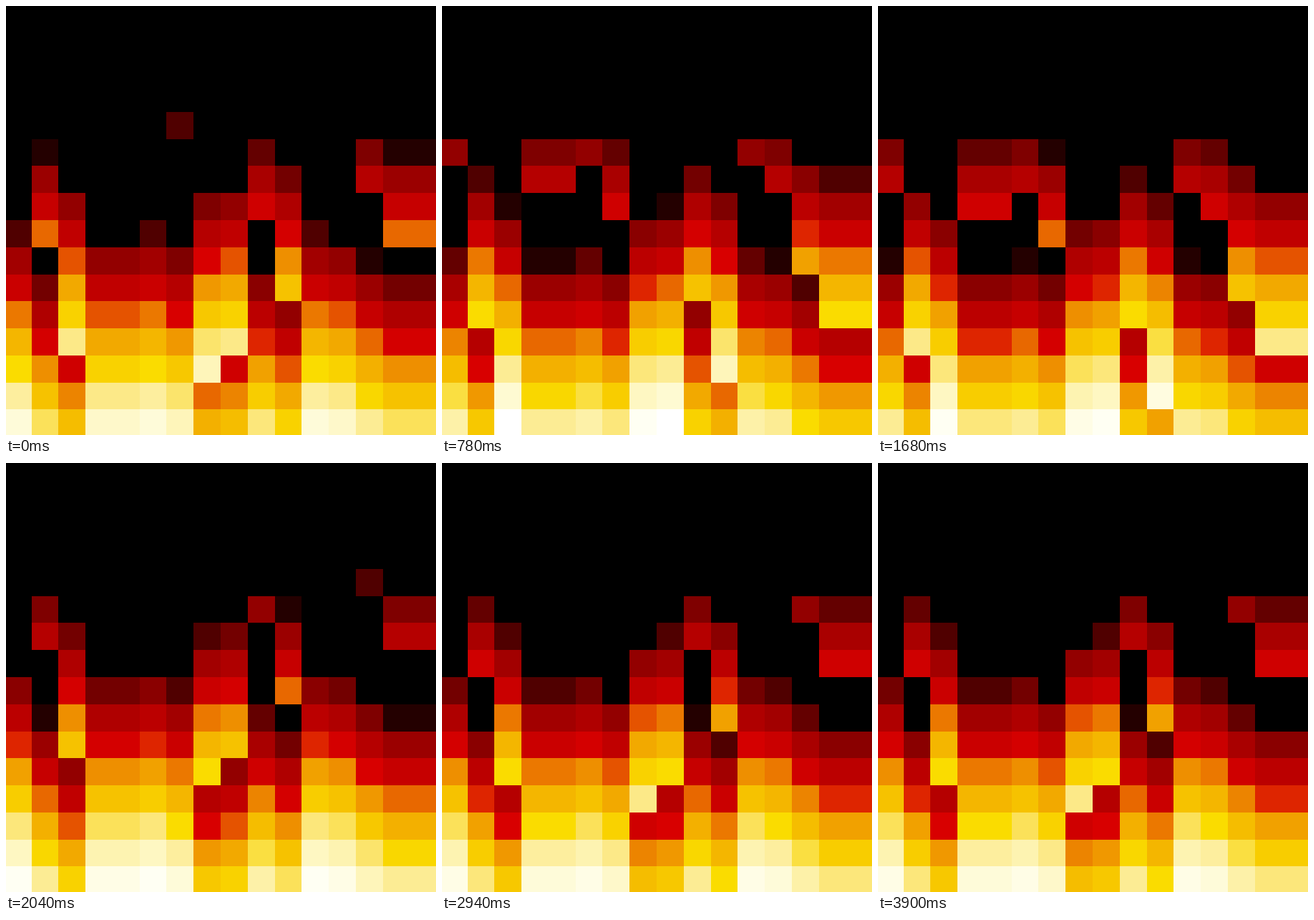
Write an HTML page with a canvas that moves like this. It is 601 px wide and 599 px high and loops after 3.96 s.

```html
<!DOCTYPE html>
<html>
<head>
<meta charset="utf-8">
<title>Pixel fire</title>
<style>
html, body { margin: 0; height: 100%; overflow: hidden; background: #000; }
canvas { display: block; }
</style>
</head>
<body>
<canvas id="fire" width="601" height="599"></canvas>
<script>
const ctx = document.getElementById('fire').getContext('2d');
const STEP = 60, STEPS = 66, CYCLE = 16, PITCH = 37.775;

// Where each column stands in the flicker cycle
const phases = [3, 9, 13, 4, 4, 3, 5, 14, 13, 8, 11, 3, 4, 7, 9, 9];

// Heat levels at which the ramp reaches red, yellow and white
const RED = 19, YELLOW = 37, WHITE = 57;

const mod = (a, n) => ((a % n) + n) % n;
const leftOf = col => col ? Math.floor(36.03 + PITCH * (col - 1)) : 0;
const topOf = row => row < 0 ? 599 : Math.floor(563.925 - PITCH * row);

// Fast start, slow finish, from 0 to 1 over the span
const glow = (heat, span) => (Math.max(0, heat - 0.88) / (span - 0.88)) ** (1 / 2.8);

function colour(heat) {
  if (heat <= RED) return `rgb(${216 * glow(heat, RED)},0,0)`;
  if (heat <= YELLOW) {
    const k = glow(heat - RED, YELLOW - RED);
    return `rgb(${216 + 34 * k},${220 * k},0)`;
  }
  const k = (heat - YELLOW) / (WHITE - YELLOW);
  const ease = Math.sin(k * Math.PI / 2);
  return `rgb(${250 + 5 * ease},${220 + 35 * ease},${255 * k ** (1 / 2.2)})`;
}

function draw(step) {
  ctx.fillStyle = '#000';
  ctx.fillRect(0, 0, 601, 599);
  phases.forEach((phase, col) => {
    const x = leftOf(col), w = leftOf(col + 1) - x;
    // Rows count up from the bottom; each heats up, then drops back
    for (let row = 0; row < 12; row++) {
      const heat = 57 - 5 * row - 2 * mod(phase + row - step, CYCLE);
      if (heat <= 0) continue;
      const y = topOf(row);
      ctx.fillStyle = colour(heat);
      ctx.fillRect(x, y, w, topOf(row - 1) - y);
    }
  });
}

const start = performance.now();
function tick() {
  draw(Math.floor((performance.now() - start) / STEP + 0.01) % STEPS);
  requestAnimationFrame(tick);
}
tick();
</script>
</body>
</html>
```
